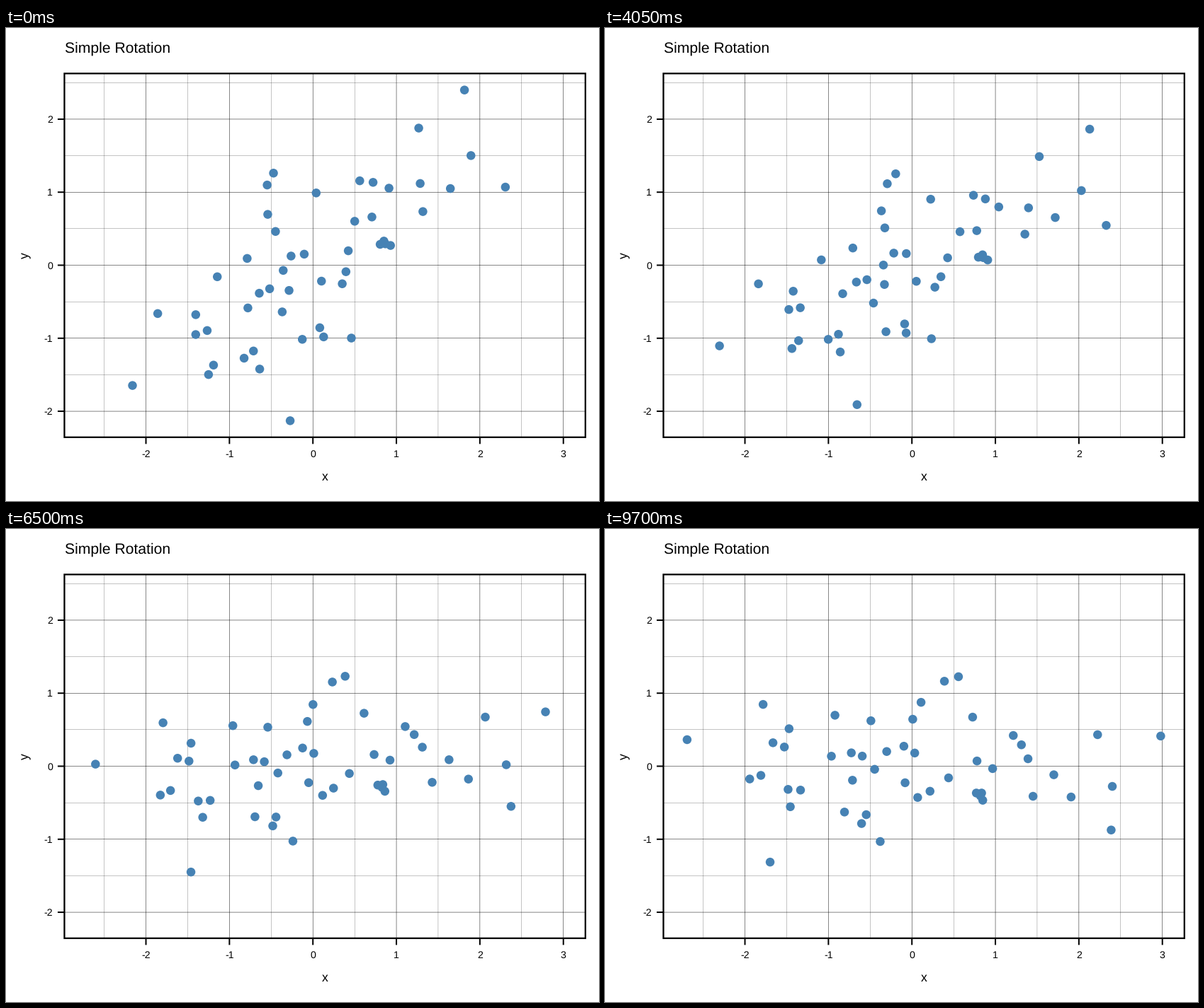
A matplotlib script for the animation above (10000 ms loop, 837 px wide and 669 px high).

```python
import math
import numpy as np
import matplotlib.pyplot as plt
from matplotlib.animation import FuncAnimation
from matplotlib.patches import Rectangle

WIDTH, HEIGHT, DPI = 837, 669, 64
FRAMES, INTERVAL = 200, 50
PT = 72 / DPI  # points per pixel
ORIGIN = np.array([433.2, 335.5])
SCALE = np.array([117.84, -103.28])
RADIUS = 6.25
COUNT = 50


def r_normals(seed, count):
    """Normal deviates as R draws them: Mersenne Twister with inversion."""
    stream = []
    for _ in range(50 + 625):
        seed = (69069 * seed + 1) % 2**32
        stream.append(seed)
    twister = np.random.MT19937(0)
    twister.state = {"bit_generator": "MT19937",
                     "state": {"key": np.array(stream[51:], dtype=np.uint32),
                               "pos": 624}}
    u = twister.random_raw(2 * count) / 2**32
    prob = (np.floor(u[::2] * 2**27) + u[1::2]) / 2**27
    z = np.linspace(-6, 6, 12001)
    cdf = [0.5 * (1 + math.erf(v / math.sqrt(2))) for v in z]
    return np.interp(prob, cdf, z)


def standardize(v):
    return (v - v.mean()) / v.std(ddof=1)


def rotate(points, degrees):
    a = math.radians(degrees)
    turn = np.array([[math.cos(a), -math.sin(a)], [math.sin(a), math.cos(a)]])
    return points @ turn.T


def to_stage(points):
    return ORIGIN + np.asarray(points) * SCALE


def cubic_in_out(t):
    return 4 * t**3 if t < 0.5 else 1 - 4 * (1 - t)**3


signal, noise = r_normals(123, 2 * COUNT).reshape(2, COUNT)
start = np.column_stack([standardize(signal), standardize(signal + noise)])
end = rotate(start, -45)

# The panel spans all data plus five percent on each side.
both = np.vstack([start, end])
low, high = both.min(axis=0), both.max(axis=0)
pad = 0.05 * (high - low)
left, bottom = to_stage(low - pad)
right, top = to_stage(high + pad)

plt.rcParams["font.family"] = "Liberation Sans"
plt.rcParams["text.hinting"] = "none"
fig = plt.figure(figsize=(WIDTH / DPI, HEIGHT / DPI), dpi=DPI, facecolor="white")
ax = fig.add_axes([0, 0, 1, 1])
ax.set_xlim(0, WIDTH)
ax.set_ylim(HEIGHT, 0)
ax.axis("off")


def line(xs, ys, width):
    ax.plot(xs, ys, color="black", lw=width * PT, zorder=1,
            solid_capstyle="butt", snap=False)


def label(x, y, text, size, ha="center", **kwargs):
    ax.text(x, y, text, fontsize=size * PT, ha=ha, va="baseline",
            color="black", **kwargs)


def grid(xs, ys, width):
    for x in xs:
        px = to_stage((x, 0))[0]
        line([px, px], [top, bottom], width)
    for y in ys:
        py = to_stage((0, y))[1]
        line([left, right], [py, py], width)


x_ticks, y_ticks = range(-2, 4), range(-2, 3)
grid(np.arange(-2.5, 3), np.arange(-1.5, 3), 0.23)
grid(x_ticks, y_ticks, 0.47)

for v in x_ticks:
    px = to_stage((v, 0))[0]
    line([px, px], [bottom, bottom + 9.5], 2)
    label(px, 607, str(v), 14.08)
for v in y_ticks:
    py = to_stage((0, v))[1]
    line([left - 9.5, left], [py, py], 2)
    label(66, py + 5, str(v), 14.08, ha="right")

ax.add_patch(Rectangle((left, top), right - left, bottom - top, fill=False,
                       ec="black", lw=2.26 * PT, zorder=4, snap=False,
                       joinstyle="miter"))
label(83, 34.3, "Simple Rotation", 21.12, ha="left")
label(450.3, 639.5, "x", 17.6)
label(32, 321.7, "y", 17.6, rotation=90, rotation_mode="anchor")

# One size per dot keeps the dots at sub-pixel positions.
dots = ax.scatter(*to_stage(start).T, s=np.full(COUNT, (2 * RADIUS * PT)**2),
                  color="steelblue", linewidths=0, zorder=3, snap=False)


def update(frame):
    p = cubic_in_out(frame / (FRAMES - 1))
    dots.set_offsets(to_stage(start + (end - start) * p))
    return [dots]


anim = FuncAnimation(fig, update, frames=FRAMES, interval=INTERVAL,
                     repeat=True, repeat_delay=0)
plt.show()
```
